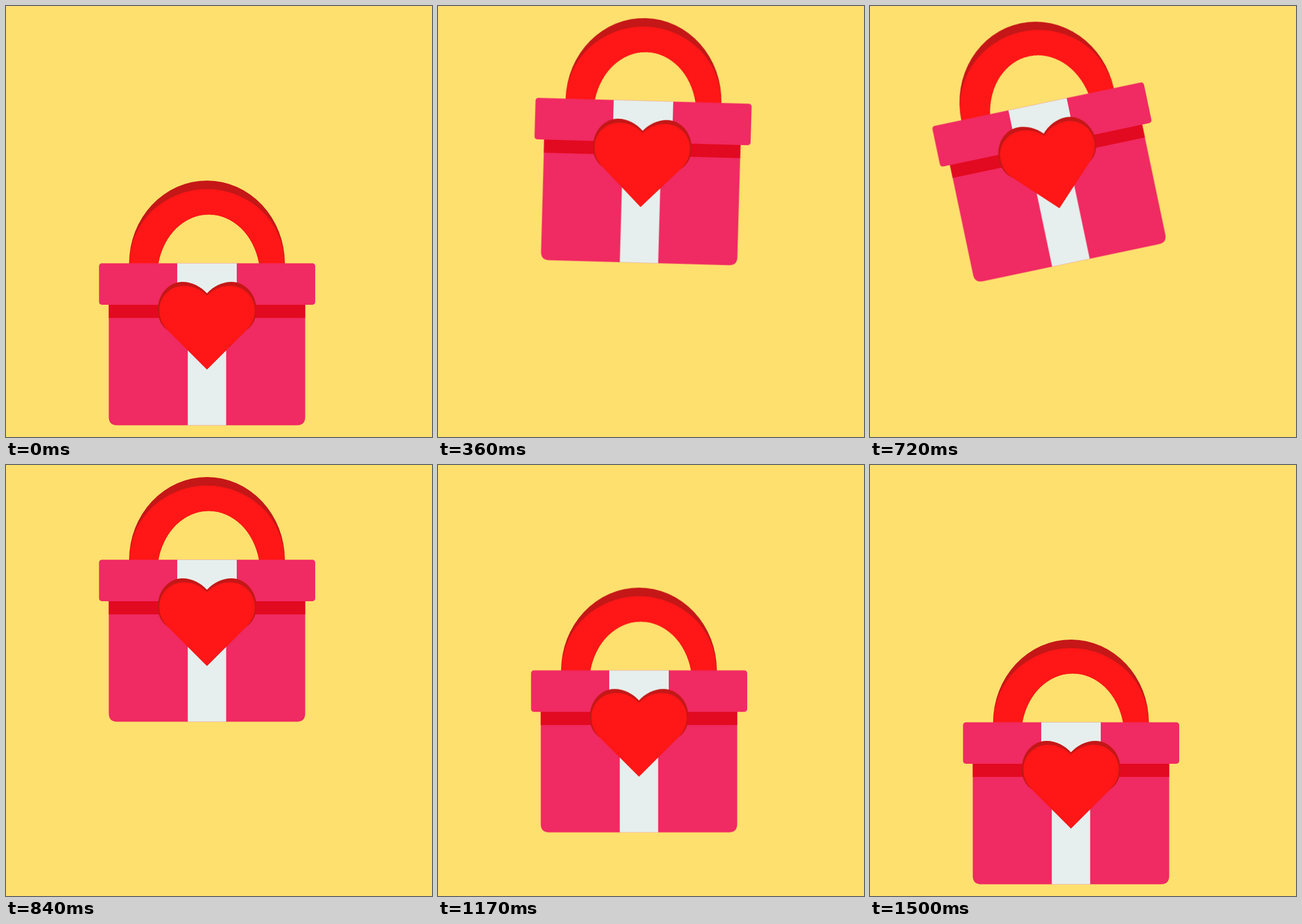
These frames come from a looping animation (744x753 px, 1.83 s). An HTML page:

```html
<!DOCTYPE html>
<html lang="en">
<head>
<meta charset="utf-8">
<title>Gift box</title>
<style>
  html, body { margin: 0; width: 100%; height: 100%; overflow: hidden; background: #fde06e; }
  svg { display: block; width: 100%; height: 100%; }
  #tilt { transform-origin: 351px 733px; }
  .pink { fill: #f02a62; }
  .red { fill: #ff1616; }
  .dark { fill: #c51717; }
  .shade { fill: #e20a20; }
  .ribbon { fill: #e6efed; }
</style>
</head>
<body>
<svg viewBox="0 0 744 753">
  <g id="lift"><g id="tilt">
    <path class="dark" d="M215 451V450A136 145 0 0 1 487 450V451H442V450A90 108.6 0 0 0 266 450V451Z"/>
    <path class="red" d="M215.5 451V450A135.5 130 0 0 1 486.5 450V451H442V450A90 108.6 0 0 0 266 450V451Z"/>
    <path class="pink" d="M179.500 520H522.500V718Q522.500 732.500 508 732.500H194Q179.500 732.500 179.500 718Z"/>
    <rect class="ribbon" x="317.500" y="540" width="67" height="192.500"/>
    <rect class="shade" x="179.500" y="520" width="343" height="25"/>
    <rect class="pink" x="162.500" y="449.500" width="377.500" height="72.500" rx="5"/>
    <rect class="ribbon" x="299" y="449.500" width="104" height="72.500"/>
    <path class="dark" d="M351 502C340 490 325 482 308 482C284 482 265 504 265 531C265 547 272 560 283 567L351 635L419 567C430 560 437.500 547 437.500 531C437.500 504 418 482 394 482C377 482 362 490 351 502Z"/>
    <path class="red" d="M351 506C340 495 326 489 311 489C287 489 268 508 268 531C268 546 273 557 281 565L351 635L421 565C429 557 434.500 546 434.500 531C434.500 508 415 489 391 489C376 489 362 495 351 506Z"/>
  </g></g>
</svg>
<script>
const LOOP = 1830, TICK = 30, HEIGHT = 284;
const SMOOTH = 'cubic-bezier(.3333,0,.6667,1)';
const FALL = 'cubic-bezier(.3333,0,.6667,.3333)';
const RISE = 'cubic-bezier(.3333,.6667,.6667,1)';

// Each step: time in ms, value, easing towards the next step.
function track(id, steps, toTransform) {
  const frames = steps.map(([time, value, easing = 'linear']) =>
    ({ offset: time / LOOP, transform: toTransform(value), easing }));
  const animation = document.getElementById(id)
    .animate(frames, { duration: LOOP, iterations: Infinity });
  animation.pause();
  return animation;
}

// The landing bounces three times, each arc lower than the last.
const dropAt = 1035, dropTime = 450;
const bounce = [
  [0, 1, FALL], [4, 0, RISE], [6, 1 / 4, FALL], [8, 0, RISE],
  [9, 1 / 16, FALL], [10, 0, RISE], [10.5, 1 / 64, FALL], [11, 0]
].map(([part, height, easing]) => [dropAt + dropTime * part / 11, height, easing]);

const swings = [
  [325, 0], [478, 12], [562, -12], [646, 12],
  [723, -12], [800, 12], [880, -12], [900, 0]
].map(step => [...step, SMOOTH]);

const tracks = [
  track('lift', [[0, 0, 'ease'], [335, 1], ...bounce, [LOOP, 0]],
    height => `translateY(${-HEIGHT * height}px)`),
  track('tilt', [[0, 0], ...swings, [LOOP, 0]],
    angle => `rotate(${angle}deg)`)
];

const start = performance.now();
function draw(now) {
  const elapsed = Math.max(0, now - start) % LOOP;
  const time = Math.floor(elapsed / TICK) * TICK;
  for (const animation of tracks) animation.currentTime = time;
  requestAnimationFrame(draw);
}
draw(start);
</script>
</body>
</html>
```
